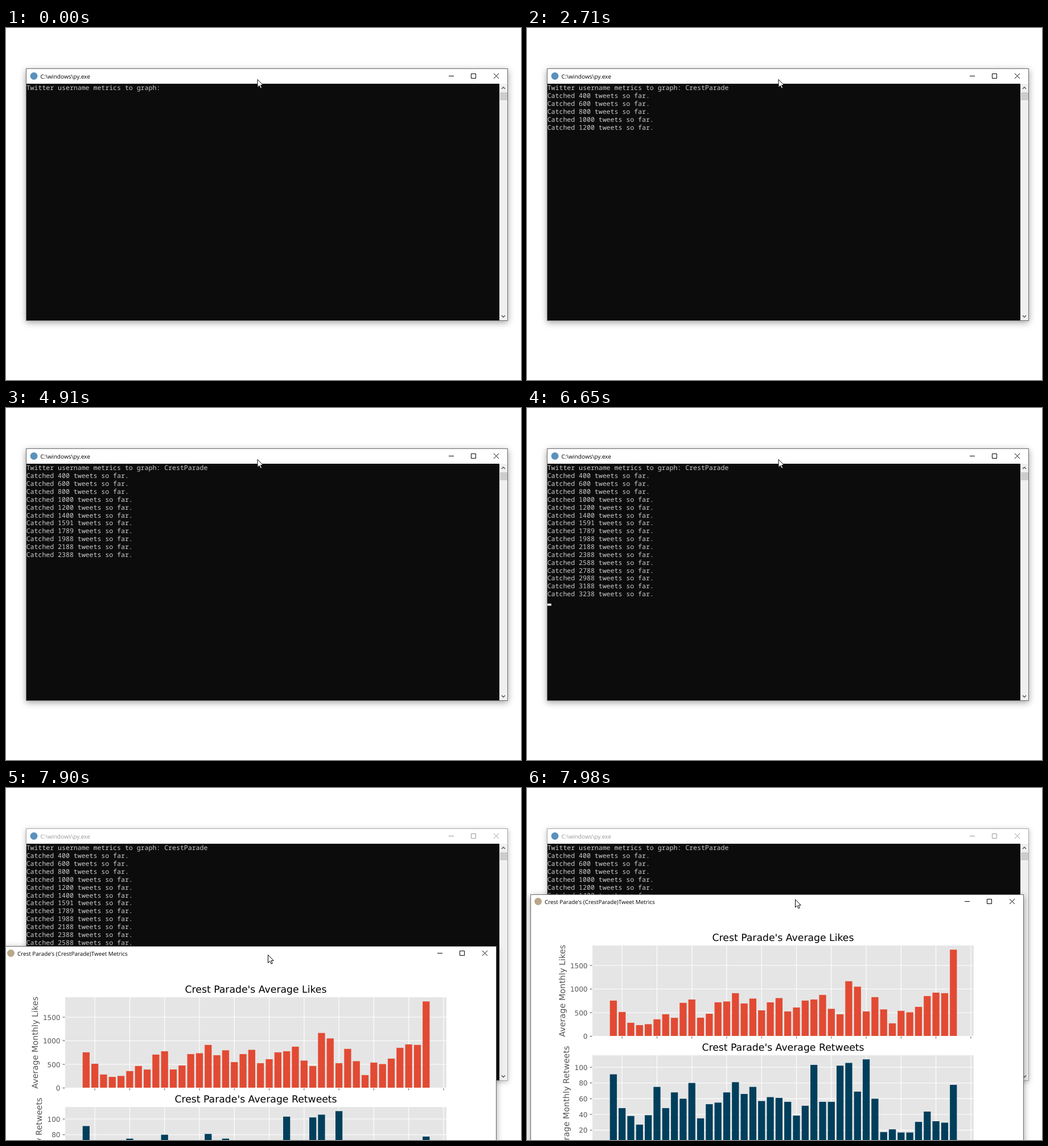
These frames come from a looping animation (905x619 px, 8000 ms). An HTML page:

```html
<!DOCTYPE html>
<html lang="en">
<head>
<meta charset="utf-8">
<title>Tweet metrics</title>
<style>
  html, body { margin: 0; width: 100%; height: 100%; overflow: hidden; background: #fff; }
  svg { display: block; text-rendering: geometricPrecision; }
  .frame { fill: #fff; stroke: #6b6b6b; filter: drop-shadow(0 3px 6px rgba(0, 0, 0, .38)); }
  .bar-title { font: 10.1px "Open Sans", "Noto Sans", sans-serif; fill: #000; }
  .buttons { fill: none; stroke: #000; }
  .blurred .frame { stroke: #a8a8a8; filter: drop-shadow(0 2px 5px rgba(0, 0, 0, .26)); }
  .blurred .bar-title { fill: #999; }
  .blurred .buttons { stroke: #999; }
  .console text { font: 11.55px "Noto Sans Mono", "DejaVu Sans Mono", monospace; fill: #ccc; white-space: pre; }
  .arrow { fill: none; stroke: #505050; stroke-width: 1.4; }
  .plot text { font-family: "DejaVu Sans", sans-serif; fill: #555; }
  .plot .title { font-size: 17.25px; fill: #000; text-anchor: middle; }
  .plot .label { font-size: 14.4px; text-anchor: middle; }
  .plot .tick { font-size: 12px; text-anchor: end; }
  .grid { stroke: #fff; stroke-width: 1.1; }
  .mark { stroke: #555; }
  .mouse { fill: #fff; stroke: #000; stroke-linejoin: round; }
</style>
</head>
<body>
<svg id="stage" width="905" height="619" viewBox="0 0 905 619">
  <g id="terminal">
    <rect class="frame" x="35.5" y="71.5" width="846" height="443"/>
    <circle cx="49" cy="84.5" r="6.5" fill="#5a92bd"/>
    <text class="bar-title" x="60.5" y="88.5">C:\windows\py.exe</text>
    <path class="buttons" d="M778 84.5h9M817.5 80.5h8v8h-8zM857 80l9 9m0-9l-9 9"/>
    <rect x="36" y="98" width="831" height="416" fill="#0c0c0c"/>
    <rect x="867" y="98" width="14" height="416" fill="#f0f0f0"/>
    <rect x="868" y="113" width="13" height="14" fill="#cdcdcd"/>
    <path class="arrow" d="M871 107l3-3 3 3M871 505.500l3 3 3-3"/>
    <g id="console" class="console"></g>
    <rect id="caret" width="7" height="3.6" fill="#fff"/>
  </g>
  <g id="chart">
    <rect class="frame" x=".5" y=".5" width="866" height="700"/>
    <circle cx="13.500" cy="12.500" r="6.500" fill="#b8a88a"/>
    <text id="chartTitle" class="bar-title" x="25" y="17" style="font-size:9.9px"></text>
    <path class="buttons" d="M763 12.500h9M802.500 8.500h8v8h-8zM842 8l9 9m0-9l-9 9"/>
    <g id="plots" class="plot"></g>
  </g>
  <path id="ghost" class="mouse"/>
  <path id="mouse" class="mouse"/>
</svg>
<script>
const LOOP = 8000;
const HANDLE = "CrestParade", NAME = "Crest Parade";
const PROMPT = "Twitter username metrics to graph: ";
const ROW = 13.87, COL = 6.93, LEFT = 35.7, BASE = 109.3;

const counts = [400, 600, 800, 1000, 1200, 1400, 1591, 1789, 1988, 2188,
  2388, 2588, 2788, 2988, 3188, 3238, 3238];
const printed = [1150, 1540, 2020, 2410, 2710, 3050, 3310, 3830, 4080, 4600,
  4910, 5260, 5610, 6040, 6390, 6610, 6730];
const caretOn = [[360, 900], [1110, 1150], [1800, 2280], [2970, 3610],
  [4160, 4560], [5260, 5920], [6650, 7230]];

// Dragged window: time, window x and y, pointer x and y
const drag = [
  [7860, -31, 454, 433, 469.5],
  [7900, -5, 278, 460, 293],
  [7940, 2, 218, 467, 230],
  [7980, 6, 187, 471, 195.5]
];

const likes = [755, 513, 285, 235, 255, 358, 465, 390, 707, 778, 392, 476, 718, 736,
  912, 694, 798, 548, 718, 808, 525, 609, 755, 778, 875, 580, 465, 1165, 1050, 525,
  828, 568, 273, 538, 507, 622, 851, 923, 912, 1833];
const retweets = [91, 48, 38, 27, 39, 75, 48, 68, 60, 80, 35, 53, 55, 68,
  81, 66, 75, 57, 62, 61, 56, 38.5, 51, 103, 56, 56, 102, 105.5, 69, 110,
  60, 17.5, 21, 17, 17, 30.5, 43.6, 31.3, 29.5, 77.6];

const $ = id => document.getElementById(id);

function add(parent, tag, attrs, text) {
  const el = document.createElementNS("http://www.w3.org/2000/svg", tag);
  for (const key in attrs) el.setAttribute(key, attrs[key]);
  if (text) el.textContent = text;
  parent.append(el);
  return el;
}

const show = (el, on) => el.setAttribute("visibility", on ? "visible" : "hidden");
const move = (el, x, y) => el.setAttribute("transform", `translate(${x} ${y})`);

function plot({ kind, data, color, top, zero, unit, step, labelX }) {
  const g = $("plots"), x0 = 109, x1 = 779, first = 145.8, pitch = 15.32;
  const mid = (x0 + x1) / 2, labelY = (top + zero) / 2;
  add(g, "rect", { x: x0, y: top, width: x1 - x0, height: zero - top, fill: "#e5e5e5" });
  for (let i = 1; i <= 41; i += 4) {
    const x = first + i * pitch;
    add(g, "path", { class: "grid", d: `M${x} ${top}V${zero}` });
    add(g, "path", { class: "mark", d: `M${x} ${zero}v4` });
  }
  for (let v = 0; zero - v * unit > top; v += step) {
    const y = zero - v * unit;
    add(g, "path", { class: "grid", d: `M${x0} ${y}H${x1}` });
    add(g, "path", { class: "mark", d: `M${x0 - 4.5} ${y}h4` });
    add(g, "text", { class: "tick", x: x0 - 8.5, y: y + 4.5 }, String(v));
  }
  data.forEach((v, i) => add(g, "rect", {
    x: first + i * pitch - 6.13, y: zero - v * unit, width: 12.26, height: v * unit, fill: color
  }));
  add(g, "path", { class: "grid", d: `M${x0} ${zero}H${x1}` });
  add(g, "text", { class: "title", x: mid, y: top - 8 }, `${NAME}'s Average ${kind}`);
  add(g, "text", { class: "label", transform: `translate(${labelX} ${labelY}) rotate(-90)` },
    `Average Monthly ${kind}`);
}

plot({ kind: "Likes", data: likes, color: "#e24a33", top: 90, zero: 249.5,
  unit: 0.083, step: 500, labelX: 60.5 });
plot({ kind: "Retweets", data: retweets, color: "#003f5c", top: 283, zero: 442.3,
  unit: 1.3825, step: 20, labelX: 67.5 });
$("chartTitle").textContent = `${NAME}'s (${HANDLE})Tweet Metrics`;

const rowY = row => BASE + row * ROW;
const prompt = add($("console"), "text", { x: LEFT, y: rowY(0) }, PROMPT);
const lines = counts.map((n, i) =>
  add($("console"), "text", { x: LEFT, y: rowY(i + 1) }, `Catched ${n} tweets so far.`));
for (const id of ["mouse", "ghost"])
  $(id).setAttribute("d", "M.5.5V14.500L3.700 11.400 6 16.300 8.200 15.300 6 10.600H10.300Z");

function render(t) {
  // One of the thirteen typing steps is the caret blinking on, the last is Enter
  const steps = Math.max(0, Math.min(13, Math.floor((t - 40) * 12 / 640) + 1));
  const typed = steps < 7 ? steps : Math.min(HANDLE.length, steps - 1);
  prompt.textContent = PROMPT + HANDLE.slice(0, typed);

  const done = printed.filter(at => t >= at).length;
  lines.forEach((line, i) => show(line, i < done));

  const entered = steps === 13;
  const row = !entered ? 0 : t >= 6770 ? 21 : done + 1;
  const col = entered ? 0 : PROMPT.length + typed;
  move($("caret"), LEFT + col * COL, rowY(row) - 1.1);
  show($("caret"), caretOn.some(([a, b]) => t >= a && t < b));

  $("terminal").setAttribute("class", t >= 7110 ? "blurred" : "");

  const pose = drag.filter(p => t >= p[0]).pop();
  show($("chart"), pose);
  show($("mouse"), pose || t < 7440);
  show($("ghost"), pose === drag[0]);
  move($("ghost"), 435, 448.5);
  if (pose) {
    move($("chart"), pose[1], pose[2]);
    move($("mouse"), pose[3], pose[4]);
  } else {
    move($("mouse"), 441.5, 90);
  }
}

const start = performance.now();
function tick() {
  render((performance.now() - start) % LOOP);
  requestAnimationFrame(tick);
}
tick();
</script>
</body>
</html>
```
